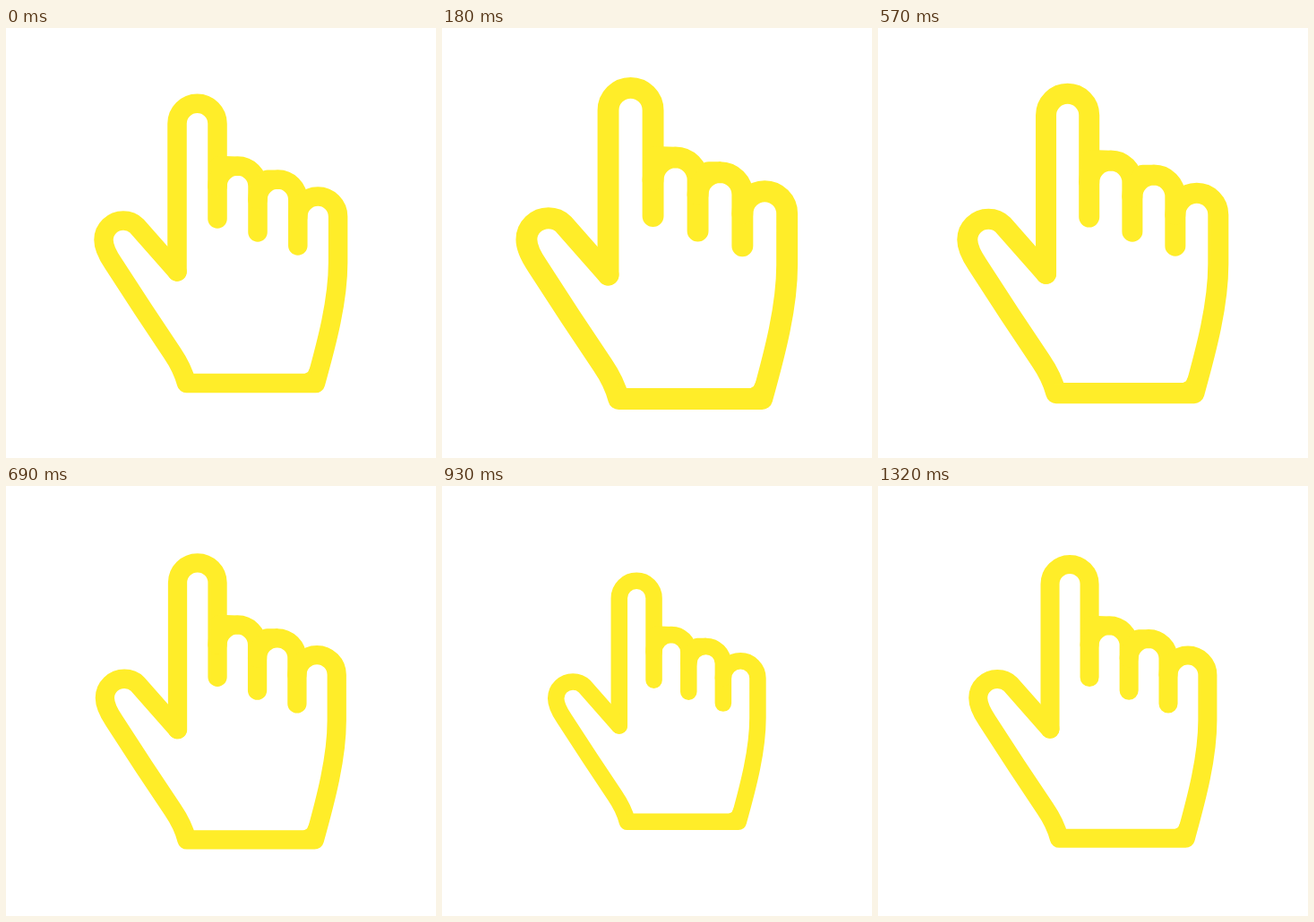
An HTML page for the animation above (1350 ms loop, 480 by 480 pixels).

```html
<!DOCTYPE html>
<html lang="en">
<head>
<meta charset="utf-8">
<title>Pulsing hand</title>
<style>
  html, body { margin: 0; width: 100%; height: 100%; overflow: hidden; background: #fff; }
  svg { display: block; width: 100%; height: 100%; }
</style>
</head>
<body>
<svg viewBox="0 0 480 480">
  <g id="hand" fill="none" stroke="#ffed29" stroke-width="21.5" stroke-linecap="round" stroke-linejoin="round">
    <!-- index finger -->
    <path d="M191 272V106.7A22.5 22.5 0 0 1 236 106.7V213"/>
    <!-- folded fingers -->
    <path d="M236 176.5A22.5 22.5 0 0 1 281 176.5V228M238 153.5L258 154.2"/>
    <path d="M281 191.5A22.4 22.5 0 0 1 325.8 191.5V243M292 169.2H303"/>
    <!-- little finger, palm and thumb -->
    <path d="M325.8 210.5A22.4 22.5 0 0 1 370.6 210.5V262C370.6 304 358.5 350 345.5 396.6H201.5
             C199 387 192.5 373 185.4 362.6L153.2 314.3L119.6 262.6C112.4 252 109 243 109 236.5
             C109 224.5 119 215 131 215C136 215 141.5 216.5 146 221L191 272"/>
    <!-- softened inner corners -->
    <path stroke="none" fill="#ffed29" d="M202 379L205.5 384L210 387H200ZM340 378L337 384L331.5 387H342Z"/>
  </g>
</svg>
<script>
  const LOOP = 1350, STEP = 30, SWING = 0.15;
  const hand = document.getElementById("hand");

  function draw(ms) {
    const t = Math.floor((ms % LOOP) / STEP) * STEP;
    const scale = 1 + SWING * Math.sin(2 * Math.PI * t / LOOP);
    hand.setAttribute("transform", `translate(240 240) scale(${scale}) translate(-240 -240)`);
  }

  const start = performance.now();
  function tick(now) {
    draw(Math.max(0, now - start));
    requestAnimationFrame(tick);
  }
  draw(0);
  requestAnimationFrame(tick);
</script>
</body>
</html>
```
